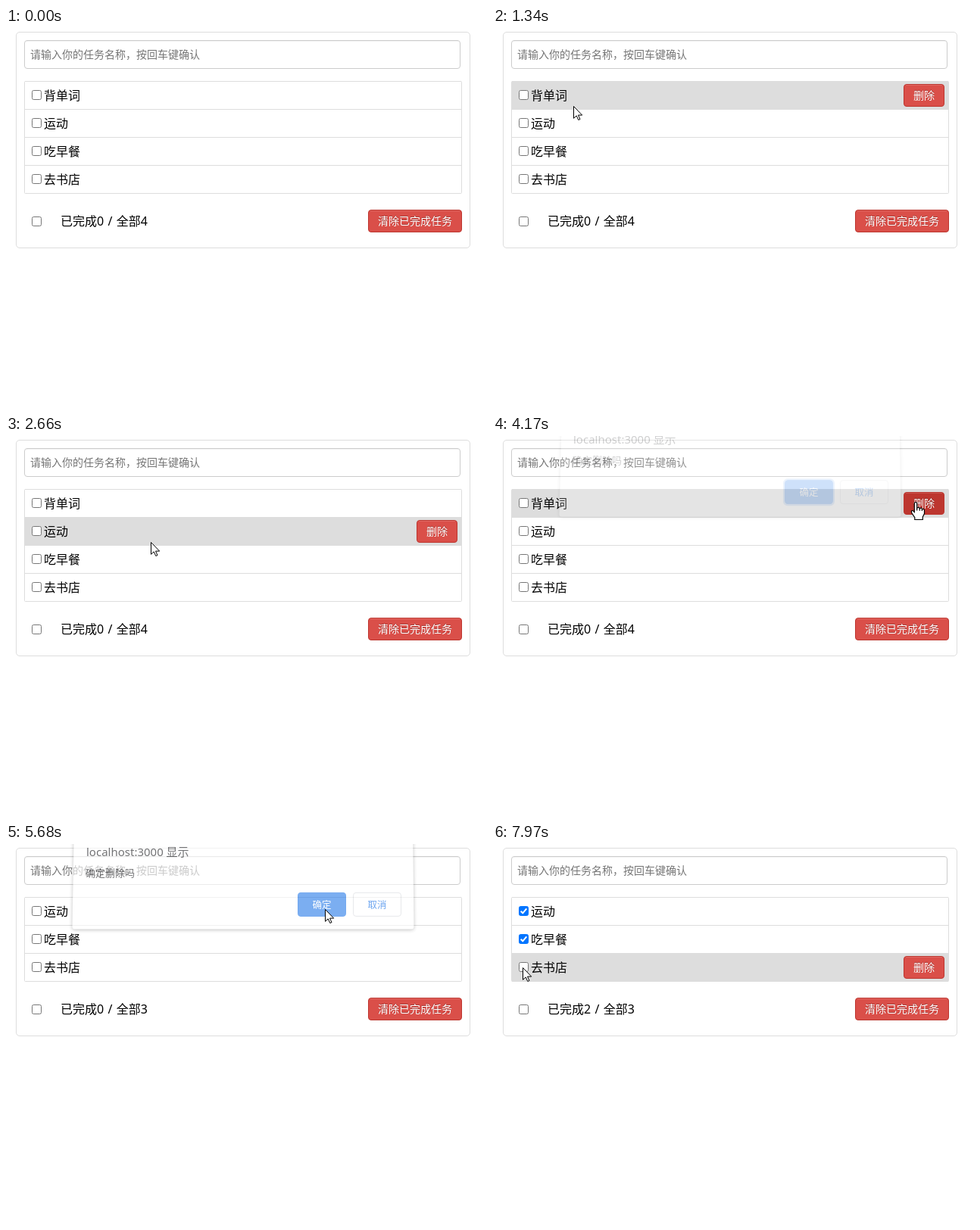
These frames come from a looping animation (635 by 502 pixels, 8000 ms). An HTML page with a canvas:

```html
<!DOCTYPE html>
<html lang="zh-CN">
<head>
<meta charset="utf-8">
<title>任务清单</title>
<style>
html, body { margin: 0; width: 100%; height: 100%; overflow: hidden; background: #fff; }
canvas { display: block; }
</style>
</head>
<body>
<canvas id="stage" width="635" height="502"></canvas>
<script>
const LOOP = 8000, ROW = 37, LIST_TOP = 70;
const LAG = 40; // hover state trails the pointer
const FONT = '"Noto Sans", "Noto Sans CJK SC", "Noto Sans CJK", sans-serif';
const stage = document.getElementById('stage').getContext('2d');
const layer = document.createElement('canvas');
layer.width = 635;
layer.height = 502;
const sheet = layer.getContext('2d');

const TASKS = ['背单词', '运动', '吃早餐', '去书店'];
const PRESSED = { '运动': 6790, '吃早餐': 7400 };
const CHECKED = { '运动': 6930, '吃早餐': 7540 };
const DIALOG_OPEN = 4170, DIALOG_CLOSE = 5590, REMOVED = 5630, DIALOG_GONE = 5770;

// time, x, y
const POINTER = [
  [480, 122, 480], [800, 118, 300], [1050, 110, 180], [1250, 106, 122],
  [1290, 106, 106], [1340, 106, 103], [1530, 108, 98], [1680, 110, 102],
  [1900, 132, 155], [2150, 158, 194], [2470, 162, 192], [2560, 174, 165],
  [2620, 184, 143], [2660, 190, 140], [2850, 300, 118], [3100, 480, 94],
  [3260, 553, 89], [3470, 558, 88], [3620, 558, 87], [4500, 558, 87],
  [4700, 530, 110], [4850, 490, 117], [5000, 442, 97], [5110, 422, 86],
  [5680, 422, 86], [5850, 330, 96], [6150, 140, 102], [6370, 66, 99],
  [6560, 46, 92], [6790, 43, 92], [7030, 43, 94], [7070, 43, 107],
  [7210, 43, 123], [7700, 43, 125], [7850, 41, 138], [7930, 39, 150], [7970, 39, 163]
];
// time, vertical shift, opacity
const DIALOG = [
  [4170, -16, .2], [4220, -9, .55], [4260, -3, .85], [4310, 0, 1],
  [5590, 0, 1], [5680, -10, .63], [5730, -16, .25], [5770, -18, 0]
];

function track(keys, t) {
  const i = keys.findIndex(k => k[0] > t);
  if (i < 0) return keys[keys.length - 1].slice(1);
  if (i === 0) return keys[0].slice(1);
  const a = keys[i - 1], b = keys[i], p = (t - a[0]) / (b[0] - a[0]);
  return [1, 2].map(n => a[n] + (b[n] - a[n]) * p);
}

const inside = ([px, py], x, y, w, h) => px >= x && px < x + w && py >= y && py < y + h;

function text(c, str, x, y, size, color) {
  c.font = `${size}px ${FONT}`;
  c.fillStyle = color;
  c.fillText(str, x, y);
}

function box(c, x, y, w, h, r, fill, border) {
  c.beginPath();
  c.roundRect(x + .5, y + .5, w - 1, h - 1, r);
  if (fill) { c.fillStyle = fill; c.fill(); }
  if (border) { c.lineWidth = 1; c.strokeStyle = border; c.stroke(); }
}

function redButton(label, x, y, w, hot) {
  box(stage, x, y, w, 30, 3.5, hot ? '#bd362f' : '#da4f49', '#bd362f');
  stage.fillStyle = 'rgba(255,255,255,.15)';
  stage.fillRect(x + 3, y + 1, w - 6, 1);
  text(stage, label, x + 13, y + 19, 14, 'rgba(0,0,0,.25)');
  text(stage, label, x + 13, y + 20, 14, '#fff');
}

function checkbox(x, y, { checked, hot, pressed } = {}) {
  if (!checked) {
    box(stage, x, y, 13, 13, 2, '#fff', pressed ? '#8d8d8d' : hot ? '#4f4f4f' : '#767676');
    return;
  }
  const blue = hot ? '#005cc8' : '#0075ff';
  box(stage, x, y, 13, 13, 2, blue, blue);
  stage.beginPath();
  stage.moveTo(x + 2.7, y + 6.7);
  stage.lineTo(x + 5.3, y + 9.3);
  stage.lineTo(x + 10.3, y + 3.3);
  stage.lineWidth = 2;
  stage.strokeStyle = '#fff';
  stage.stroke();
}

function hoverPoint(t) {
  if (t < 520 || (t >= REMOVED && t < DIALOG_GONE)) return [-1, -1];
  return track(POINTER, t >= DIALOG_OPEN && t < REMOVED ? DIALOG_OPEN : t - LAG);
}

function page(t, mouse) {
  const tasks = t < REMOVED ? TASKS : TASKS.slice(1);
  const end = LIST_TOP + ROW * tasks.length;
  let done = 0, hand = false;

  box(stage, 13, 5, 600, end + 68, 4.5, null, '#ddd');
  box(stage, 24, 16, 576, 38, 3.5, null, '#ccc');
  stage.fillStyle = 'rgba(0,0,0,.05)';
  stage.fillRect(27, 17, 570, 1);
  text(stage, '请输入你的任务名称，按回车键确认', 32, 40, 14, '#757575');

  box(stage, 24, LIST_TOP, 578, end - LIST_TOP + 1, 1, null, '#ddd');
  tasks.forEach((name, i) => {
    const y = LIST_TOP + ROW * i;
    const over = inside(mouse, 24, y + .5, 578, ROW);
    const checked = t >= CHECKED[name];
    const onBox = inside(mouse, 34, y + 12, 13, 13);
    const onDelete = inside(mouse, 542, y + 4, 54, 30);
    if (checked) done++;
    stage.fillStyle = '#ddd';
    stage.fillRect(25, y, 576, over ? ROW + 1 : 1);
    checkbox(34, y + 12, { checked, hot: onBox, pressed: t >= PRESSED[name] && !checked });
    text(stage, name, 50, y + 25, 16, '#000');
    if (over) redButton('删除', 542, y + 4, 54, onDelete);
    hand = hand || onBox || onDelete;
  });

  checkbox(34, end + 31);
  stage.wordSpacing = '1.2px';
  text(stage, `已完成${done} / 全部${tasks.length}`, 72, end + 43, 16, '#000');
  stage.wordSpacing = '0px';
  redButton('清除已完成任务', 478, end + 22, 124, false);
  return hand;
}

function dialog(t) {
  if (t < DIALOG_OPEN || t >= DIALOG_GONE) return;
  const [shift, alpha] = track(DIALOG, t);
  const tilt = -shift * .2;
  sheet.clearRect(0, 0, 635, 502);
  sheet.save();
  sheet.translate(0, shift);

  sheet.shadowColor = 'rgba(0,0,0,.4)';
  sheet.shadowBlur = 5;
  sheet.shadowOffsetY = 1;
  sheet.fillStyle = '#fff';
  sheet.beginPath();
  sheet.moveTo(88 + tilt, -20);
  sheet.lineTo(538 - tilt / 2, -20);
  sheet.lineTo(538.5, 119);
  sheet.quadraticCurveTo(538.5, 122.5, 535, 122.5);
  sheet.lineTo(91, 122.5);
  sheet.quadraticCurveTo(87.5, 122.5, 87.5, 119);
  sheet.fill();
  sheet.shadowColor = 'transparent';

  text(sheet, 'localhost:3000 显示', 106, 26, 15, '#202124');
  text(sheet, '确定删除吗', 105, 53, 13, '#202124');
  if (t < DIALOG_CLOSE) {
    sheet.beginPath();
    sheet.roundRect(384, 73, 66, 34, 5);
    sheet.lineWidth = 2;
    sheet.strokeStyle = '#a3c7f6';
    sheet.stroke();
  }
  box(sheet, 385, 74, 64, 32, 3.5, '#1a73e8', '#1a73e8');
  const glow = Math.min(1, Math.max(0, (t - 5250) / 200)) * .08;
  box(sheet, 385, 74, 64, 32, 3.5, `rgba(255,255,255,${glow})`);
  text(sheet, '确定', 404.5, 95, 12.5, '#fff');
  box(sheet, 458, 74, 64, 32, 3.5, '#fff', '#dadce0');
  text(sheet, '取消', 477.5, 95, 12.5, '#1a73e8');
  sheet.restore();

  stage.globalAlpha = alpha;
  stage.drawImage(layer, 0, 0);
  stage.globalAlpha = 1;
}

const ARROW = new Path2D('M.5 .5V16.3L4.2 12.9L6.8 18.5L9 17.5L6.5 12.1H11.7Z');
const HAND = new Path2D('M-1.7 1.8Q0 -1 1.7 1.8V8Q4 6.4 5.3 8.6Q7.4 7.4 8.4 9.6' +
  'Q11.5 8.6 11.5 12V15.5L9.3 20V23.5H-1.2V20.7L-5 15Q-6.6 10.7 -3.6 11.7L-1.7 13.6Z');
const KNUCKLES = new Path2D('M1.7 8V11.5M5.3 8.6V11.8M8.4 9.6V12');

function pointer(t, hand) {
  if (t < 480) return;
  const [x, y] = track(POINTER, t).map(Math.round);
  stage.save();
  stage.translate(x, y);
  stage.lineWidth = hand ? 1.2 : 1;
  stage.fillStyle = '#fff';
  stage.strokeStyle = '#000';
  const shape = hand ? HAND : ARROW;
  stage.fill(shape);
  stage.stroke(shape);
  if (hand) stage.stroke(KNUCKLES);
  stage.restore();
}

function draw(t) {
  stage.fillStyle = '#fff';
  stage.fillRect(0, 0, 635, 502);
  const hand = page(t, hoverPoint(t));
  dialog(t);
  pointer(t, hand && !(t >= 4500 && t < DIALOG_GONE));
}

const start = performance.now();
function tick() {
  draw((performance.now() - start) % LOOP);
  requestAnimationFrame(tick);
}
tick();
</script>
</body>
</html>
```
